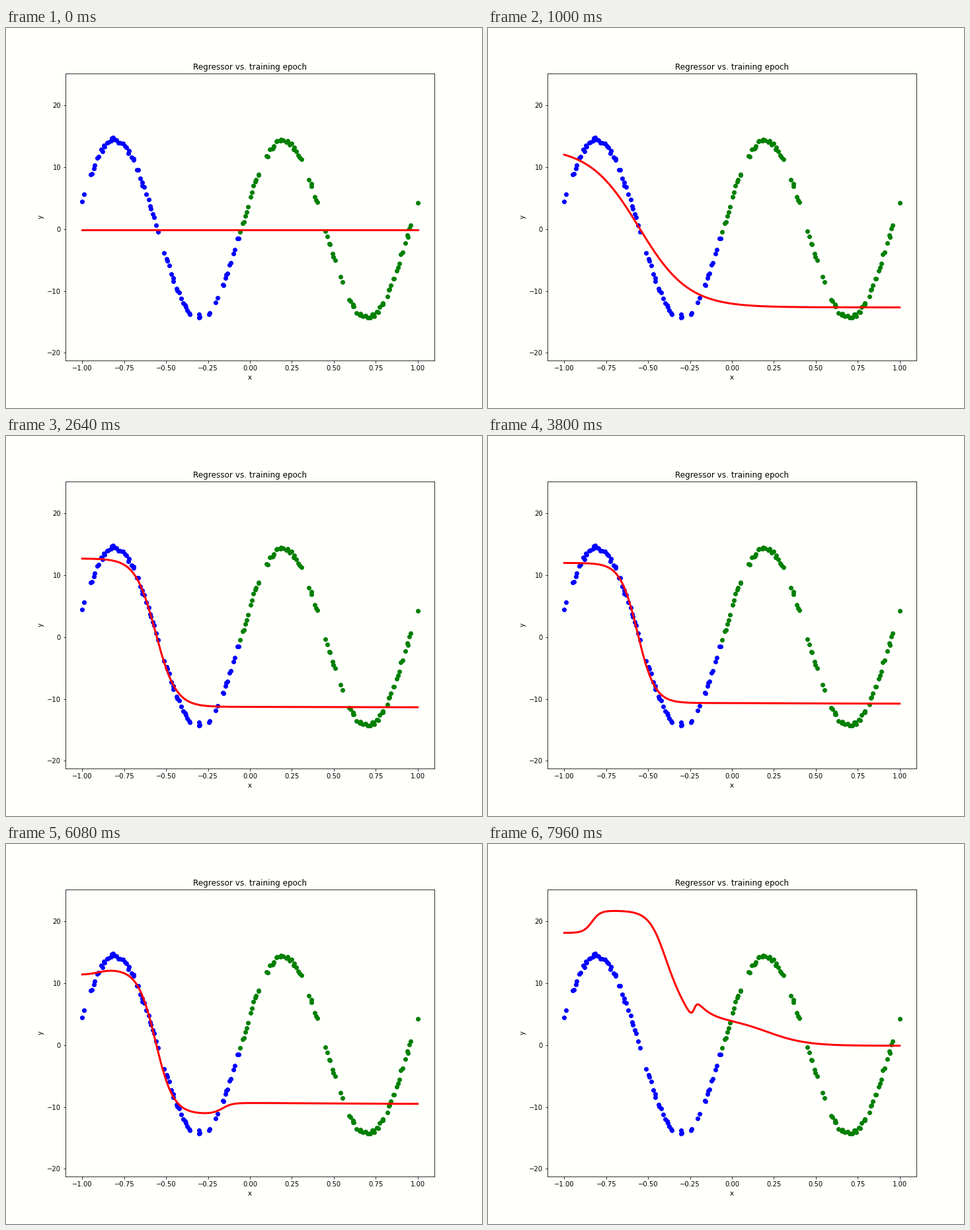
These frames come from a looping animation (720x576 px, 8000 ms). A matplotlib script:

```python
import numpy as np
import matplotlib.pyplot as plt
from matplotlib.animation import FuncAnimation

FRAMES, STEP = 200, 40
PAPER = "#fffffc"
SPLIT = -0.068

# Stretches of x without samples
GAPS = [(-0.99, -0.966), (-0.546, -0.516), (-0.345, -0.308), (-0.298, -0.256),
        (-0.237, -0.213), (-0.189, -0.17), (0.069, 0.091), (0.31, 0.34),
        (0.41, 0.446), (0.512, 0.536), (0.556, 0.587), (0.97, 0.995)]

plt.rcParams.update({"font.family": "DejaVu Sans", "font.size": 10})


def sigmoid(z):
    return 0.5 * (1 + np.tanh(z / 2))


def ramp(t, start, end):
    return np.clip((t - start) / (end - start), 0, 1)


def smooth(t, start, end):
    p = ramp(t, start, end)
    return p * p * (3 - 2 * p)


def fitted(x, t):
    """Falling sigmoid that steepens, then bends at both ends."""
    late = smooth(t, 4.9, 8.4)
    grow = ramp(t, 0, 0.44)
    low = np.interp(t, [0.44, 1.64, 3.8], [-13.35, -11.8, -10.65]) - 1.8 * late
    height = 26.5 - 3.85 * ramp(t, 0.44, 3.8) + 2.9 * late
    steep = min(0.8 + 6 * t, 19.5) - 2 * late
    middle = -0.563 + 0.06 * np.exp(-2 * t)

    y = -0.15 + grow * (low + 0.15)
    y += grow * height * sigmoid(steep * (middle - x))
    y -= (0.35 * smooth(t, 3.8, 5.4) + 2.1 * late) * sigmoid(-28 * (x + 0.9))
    y += 6.8 * late * sigmoid((18 + 60 * late) * (x + 0.165))
    return y - 0.03 * t * grow * sigmoid(4 * (x - 0.45))


def diverged(x):
    """Shape the regressor jumps to when training blows up."""
    return (18.15 + 3.6 * sigmoid(40 * (x + 0.835))
            - 12.4 * sigmoid(21 * (x + 0.405))
            - 8.55 * sigmoid(16 * (x + 0.26))
            + 3.6 * sigmoid(110 * (x + 0.225))
            - 4.5 * sigmoid(8.5 * (x - 0.21)))


def regress(x, t):
    p = ramp(t, 7.7, 7.96)
    blend = p * (1 + 2.6 * (1 - p))  # overshoots, then settles
    return (1 - blend) * fitted(x, t) + blend * diverged(x)


def samples(rng):
    x = np.linspace(-1, 1, 205)
    x = np.clip(x + rng.normal(0, 0.004, x.size), -1, 1)
    for a, b in GAPS:
        x = x[(x < a) | (x > b)]
    return x, 14.4 * np.sin(6.265 * x + 0.33) + rng.normal(0, 0.22, x.size)


fig = plt.figure(figsize=(10, 8), dpi=72, facecolor=PAPER)
fig.subplots_adjust(left=0.125, right=0.9, bottom=0.125, top=0.88)
ax = fig.add_subplot(facecolor=PAPER)
ax.set(title="Regressor vs. training epoch", xlabel="x", ylabel="y",
       xlim=(-1.1, 1.1), ylim=(-21.24, 25.15))

x, y = samples(np.random.default_rng(4))
train = x < SPLIT
ax.scatter(x[train], y[train], color="blue")
ax.scatter(x[~train], y[~train], color="green")

grid = np.linspace(-1, 1, 400)
curve, = ax.plot(grid, regress(grid, 0), color="red", lw=3)


def update(i):
    curve.set_ydata(regress(grid, i * STEP / 1000))
    return curve,


anim = FuncAnimation(fig, update, frames=FRAMES, interval=STEP,
                     repeat=True, repeat_delay=0)
plt.show()
```
